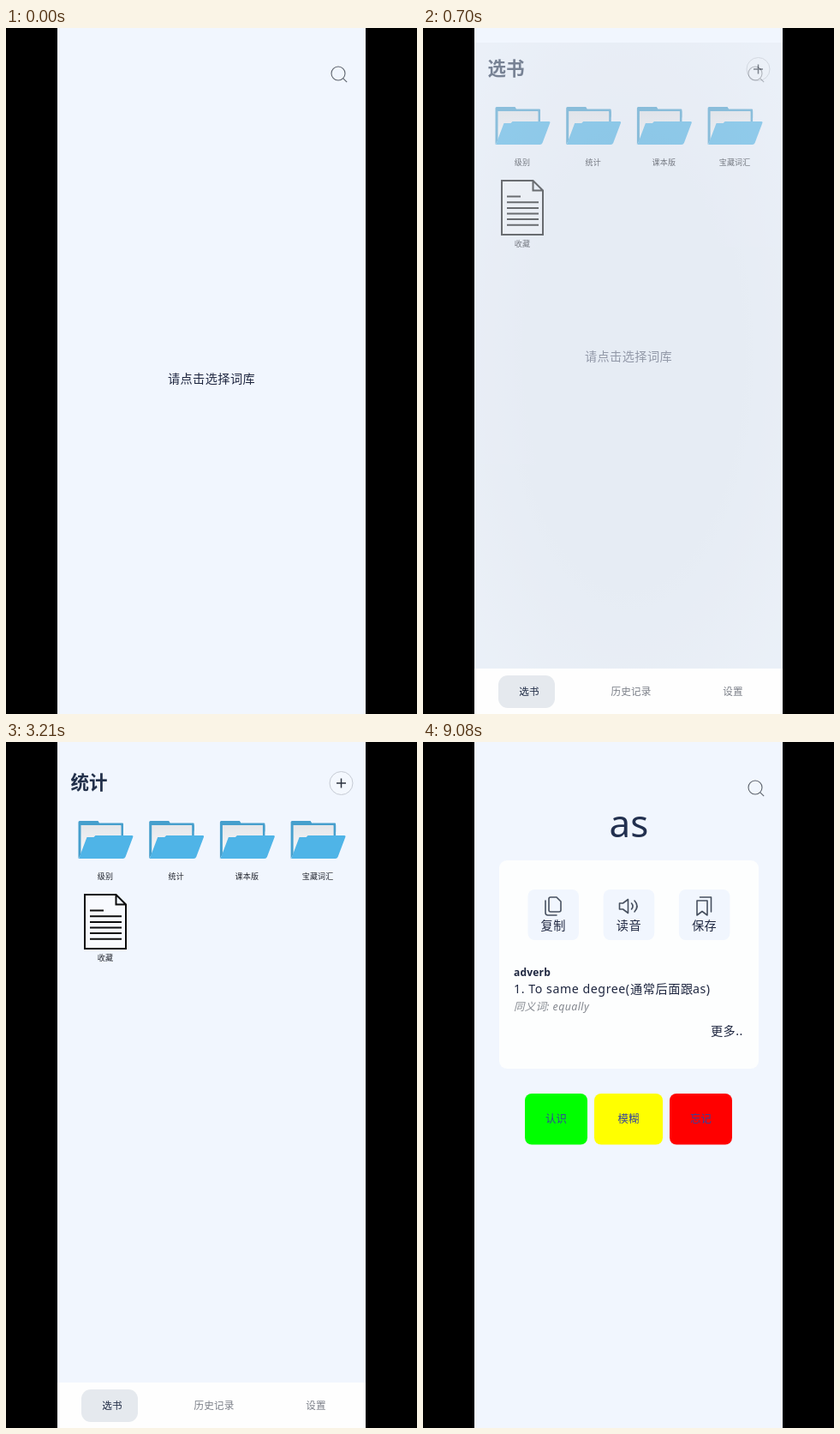
Animation, 480 px wide and 800 px high, one loop 9.57 s. Source, as an HTML page:

```html
<!DOCTYPE html>
<html lang="zh-CN">
<head>
<meta charset="utf-8">
<title>单词本</title>
<style>
  html, body { margin: 0; width: 100%; height: 100%; overflow: hidden; background: #000; }
  svg { display: block; width: 100vw; height: 100vh; }
  text { font: 14.2px "Noto Sans", "Noto Sans CJK SC", "Noto Sans CJK", sans-serif; letter-spacing: .4px; fill: #1f2740; }
  .mid { text-anchor: middle; }
  text.title { font-size: 21.5px; font-weight: 700; fill: #22304a; letter-spacing: 0; }
  text.label { font-size: 9px; letter-spacing: .2px; fill: #23262e; }
  text.tab { font-size: 11.6px; letter-spacing: .1px; fill: #7b7f88; }
  text.tab.on { fill: #1f2b45; }
  text.answer { font-size: 12.4px; letter-spacing: .1px; fill: #33439c; }
  text.word { font-size: 44px; font-weight: 500; letter-spacing: 0; fill: #22304f; }
  text.kind { font-size: 12px; font-weight: 700; letter-spacing: .2px; }
  text.meaning { letter-spacing: .55px; }
  text.synonym { font-size: 12.4px; font-style: italic; letter-spacing: .4px; fill: #84888f; }
  .bg { fill: #f1f6fe; }
  .line { fill: none; stroke: #47505f; stroke-width: 1.6; stroke-linejoin: round; stroke-linecap: round; }
  .ripple { fill: #e3e7ed; mix-blend-mode: multiply; opacity: 0; }
</style>
</head>
<body>
<svg viewBox="0 0 480 800">
  <defs>
    <radialGradient id="glow" r=".68">
      <stop offset=".5" stop-color="#dae0e9"/>
      <stop offset="1" stop-color="#e4eaf2"/>
    </radialGradient>
    <linearGradient id="paper" x2="0" y2="1">
      <stop stop-color="#e4e6ea"/>
      <stop offset="1" stop-color="#fafafa"/>
    </linearGradient>
    <clipPath id="phone"><rect x="60" width="360" height="800"/></clipPath>
    <g id="backdrop"><rect class="bg" x="60" width="360" height="800"/></g>
    <g id="search" fill="none" stroke="#5d636d" stroke-width="1.1">
      <circle cx="388" cy="53" r="8"/><path d="M393.8 58.8l4.4 4.4"/>
    </g>
    <g id="folder">
      <path fill="#469fcd" d="M0 44V1.5Q0 0 1.5 0H23l1.5 2.500H51.500q1 0 1 1V30H8z"/>
      <path fill="url(#paper)" d="M3 5H50V26H10L3 40z"/>
      <path fill="#469fcd" d="M50 5l2.500 8V5z"/>
      <path fill="#4fb4e7" d="M.5 44L10 19h8l2-2H62.500q2 0 1.200 2L55 42q-.8 2-3 2z"/>
    </g>
    <g id="sheet" fill="none" stroke="#0c0c0c" stroke-width="2">
      <path fill="#f8fafe" d="M1 1H37.500L49 12.500V64H1zM37.500 1V12.500H49"/>
      <path d="M7 19.500H23"/>
    </g>
  </defs>

  <g clip-path="url(#phone)">
    <g id="home">
      <use href="#backdrop"/>
      <rect id="homeRipple" x="60" y="17" width="360" height="730" fill="url(#glow)"/>
      <use href="#search"/>
      <text id="hint" class="mid" x="240" y="414">请点击选择词库</text>
    </g>

    <g id="study">
      <use href="#backdrop"/>
      <use href="#search"/>
      <text class="word mid" x="240.500" y="111">as</text>
      <rect x="89" y="138" width="303" height="243" rx="9" fill="#fdfefe"/>
      <g id="tools"></g>
      <g class="line">
        <path d="M149 181h7l5 5v10q0 2-2 2H149q-2 0-2-2V183q0-2 2-2z"/>
        <path d="M143 185v14q0 3 3 3h10"/>
        <path d="M229.500 188v7h4l6 4.500v-16l-6 4.500zM243.500 188q3 3.500 0 7M247 185q6 6.500 0 13"/>
        <path d="M320 185h12v17l-6-4.500l-6 4.500zM323.500 181H336.500V198"/>
      </g>
      <text class="kind" x="106" y="273">adverb</text>
      <text class="meaning" y="293"><tspan x="106">1. To same degree(</tspan><tspan x="242">通常后面跟</tspan><tspan x="315">as)</tspan></text>
      <text class="synonym" x="106" y="313">同义词: equally</text>
      <text x="336" y="342">更多..</text>
      <g id="answers"></g>
    </g>

    <g id="browse">
      <use href="#backdrop"/>
      <text id="title" class="title" x="75.500" y="55">选书</text>
      <circle cx="391.500" cy="48" r="13.500" fill="#f4f8fe" stroke="#c6cbd4"/>
      <path d="M386 48h11M391.500 42.500v11" stroke="#2b323e" stroke-width="1.500"/>
      <g id="root">
        <use href="#sheet" x="91" y="177"/>
        <text class="label mid" x="116" y="255">收藏</text>
      </g>
      <g id="files"></g>
      <rect id="cellRipple" class="ripple" x="162" y="84" width="64" height="84" rx="5"/>
    </g>

    <g id="nav">
      <rect x="60" y="747" width="360" height="53" fill="#fefefe"/>
      <rect x="88" y="755" width="66" height="38" rx="11" fill="#e5e9ee"/>
      <g id="tabs"></g>
    </g>
  </g>
</svg>

<script>
const LOOP = 9570;
const $ = id => document.getElementById(id);
const fill = (id, items, markup) => $(id).innerHTML += items.map(markup).join('');
const column = i => 82.7 * i;

fill('sheet', [...Array(5).keys()], i => `<path d="M7 ${26.3 + 6.6 * i}H44"/>`);
fill('root', ['级别', '统计', '课本版', '宝藏词汇'], (name, i) =>
  `<use href="#folder" x="${84.5 + column(i)}" y="92"/>
   <text class="label mid" x="${116 + column(i)}" y="159.500">${name}</text>`);
fill('files', ['长度', '频率统计top4k'], (name, i) =>
  `<use href="#sheet" x="${87 + column(i)}" y="82"/>
   <text class="label mid" x="${111.5 + column(i)}" y="159.500">${name}</text>`);
fill('tabs', ['选书', '历史记录', '设置'], (name, i) =>
  `<text class="tab mid ${i ? '' : 'on'}" x="${124 + 119 * i}" y="777.500">${name}</text>`);
fill('tools', ['复制', '读音', '保存'], (name, i) => {
  const box = `x="${122.5 + 88.2 * i}" y="172" width="59.500" height="59" rx="8"`;
  return `<rect class="bg" ${box}/><rect id="press${i}" class="ripple" ${box}/>
    <text class="mid" x="${152.2 + 88.2 * i}" y="218.500">${name}</text>`;
});
fill('answers', [['认识', 119, 73, '#0f0'], ['模糊', 200, 80, '#ff0'], ['忘记', 288, 73, '#f00']], ([name, x, w, color]) =>
  `<rect x="${x}" y="410" width="${w}" height="59.500" rx="8" fill="${color}"/>
   <text class="answer mid" x="${x + w / 2}" y="444">${name}</text>`);

const OPEN = 560, FADE = 430, CLOSE = 5260, NAV_OUT = 4930, TAP = 180;
const VISITS = [[1030, 1970], [2790, 3210], [3950, LOOP]];   // folder tapped, back pressed
const TOOL_TAPS = [6900, 7890, 8380, 8880];

// Eased progress from 0 to 1 starting at a given time.
function ease(t, start, length) {
  const p = Math.min(1, Math.max(0, (t - start) / length));
  return 1 - (1 - p) ** 2;
}
const tap = (t, start, hold = 0) => ease(t, start, TAP / 2) * (1 - ease(t, start + TAP / 2 + hold, TAP / 2));
const show = (id, opacity) => $(id).style.opacity = opacity;
const lift = (id, y) => $(id).setAttribute('transform', `translate(0 ${y})`);

function draw(now) {
  const t = now % LOOP;
  const navUp = ease(t, 40, 260) - ease(t, NAV_OUT, 250);
  const inFolder = VISITS.some(([enter, back]) => t >= enter + TAP && t < back);
  const cameBack = t >= VISITS[0][1] && !inFolder;

  lift('nav', 53 * (1 - navUp));
  lift('hint', -26 * ease(t, 40, 260));
  show('homeRipple', ease(t, 100, 400));
  show('browse', ease(t, OPEN, FADE) - ease(t, CLOSE, FADE));
  show('study', t < NAV_OUT ? 0 : 1);

  show('root', inFolder ? 0 : 1);
  show('files', inFolder ? 1 : 0);
  $('title').textContent = cameBack ? '统计' : '选书';
  show('cellRipple', Math.max(tap(t, NAV_OUT, 400), ...VISITS.map(([enter]) => tap(t, enter))));

  TOOL_TAPS.forEach((start, i) => {
    if (t >= start) show('press' + i % 3, tap(t, start));
  });
  requestAnimationFrame(draw);
}
draw(performance.now());
</script>
</body>
</html>
```
